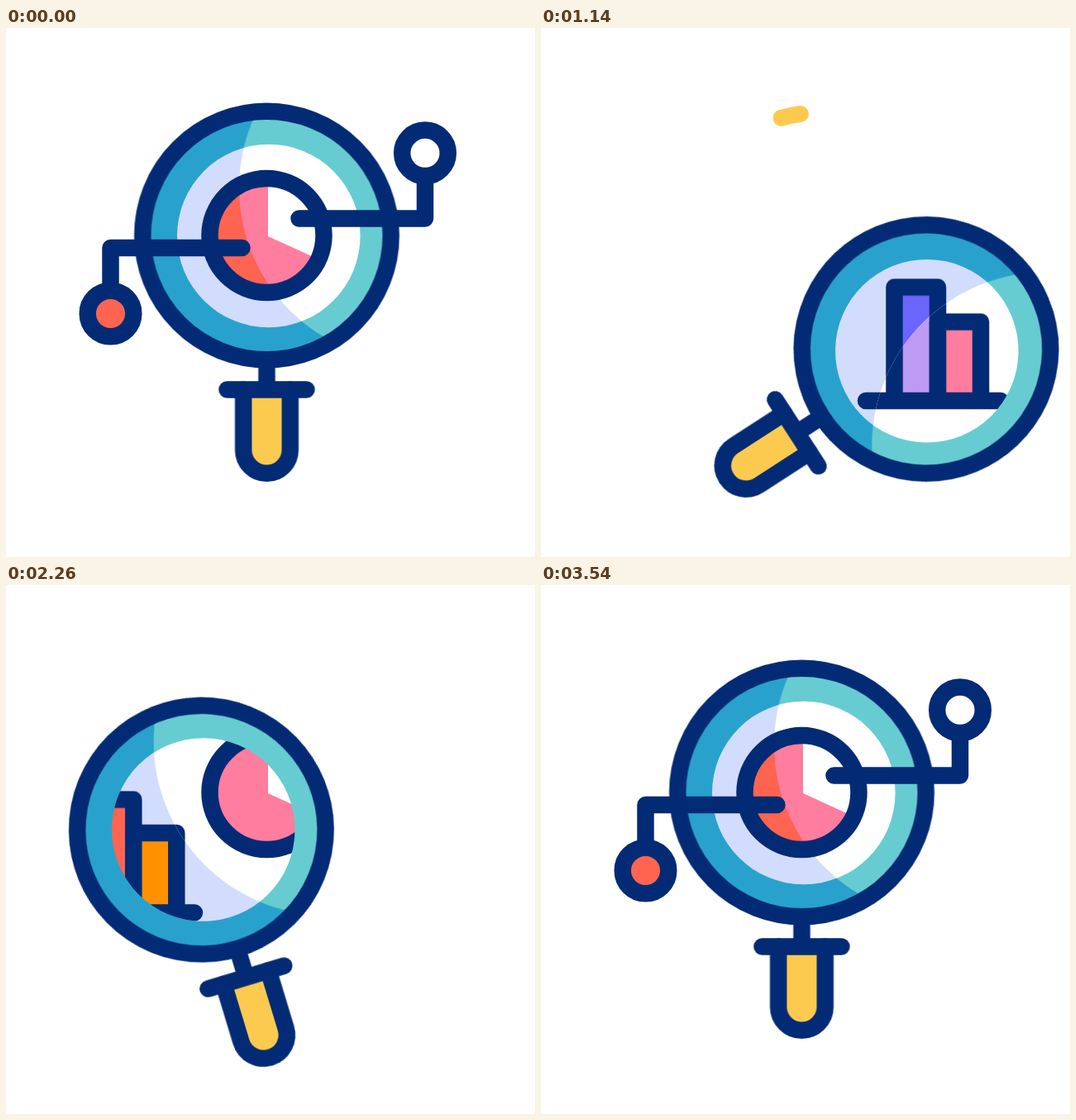
An HTML page without scripts that plays this animation: 640x640 px, repeating every 3.6 s.

```html
<!DOCTYPE html>
<html lang="en">
<head>
<meta charset="utf-8">
<title>Magnifier over charts</title>
<style>
  html, body { margin: 0; width: 100%; height: 100%; overflow: hidden; background: #fff; }
  svg { display: block; width: 100vw; height: 100vh; }

  .line { fill: none; stroke: #032b75; stroke-width: 20.5; stroke-linecap: round; stroke-linejoin: round; }
  .trail { fill: none; stroke: #fdca50; stroke-width: 20; stroke-linecap: round; }
  .trim { stroke-dasharray: 1 2; }

  .shade { --paper: #d2dcfd; --pink: #ff6450; --purple: #6a66fb; --yellow: #ff9100; }
  .light { --paper: #fff; --pink: #ff7d9f; --purple: #bd9af3; --yellow: #fdca50; }
  .paper { fill: var(--paper); }
  .pink { fill: var(--pink); }
  .purple { fill: var(--purple); }
  .yellow { fill: var(--yellow); }
  .slice { fill: none; stroke: var(--paper); stroke-width: 62; }

  .lens, .bar, .slice, .trim, .node, .ball {
    animation: 3.6s cubic-bezier(.333, 0, .667, 1) infinite;
  }
  .lens { animation-name: swing; }
  .slice { animation-name: slice; }
  .trail { animation-name: trail; }
  .ball { animation-name: pop; transform-box: fill-box; transform-origin: center; }
  .node.right { animation-name: rise; }
  .node.left { animation-name: drop; }
  .right .trim { animation-name: trim-right; }
  .left .trim { animation-name: trim-left; }
  .a { animation-name: bar-a; }
  .b { animation-name: bar-b; }
  .c { animation-name: bar-c; }
  .d { animation-name: bar-d; }

  /* The origin of the lens group is the point it swings around. */
  @keyframes swing {
    0%, 3.3% { transform: translate(315.5px, 471px) rotate(0deg); }
    27.2%, 49.8% { transform: translate(281.3px, 508px) rotate(57.1deg); }
    67.8%, 87.1% { transform: translate(304.5px, 506.4px) rotate(-34deg); }
    95.6%, 100% { transform: translate(315.5px, 471px) rotate(0deg); }
  }
  @keyframes slice {
    0%, 48.3% { stroke-dasharray: 114.5 360; }
    63.8%, 75% { stroke-dasharray: 215 360; }
    91.7%, 100% { stroke-dasharray: 114.5 360; }
  }
  @keyframes trail {
    0%, 8.3% { stroke-dashoffset: 1.1; }
    19.44% { stroke-dashoffset: .09; }
    21.5%, 25% { stroke-dashoffset: 0; }
    34.2%, 100% { stroke-dashoffset: -1.1; }
  }
  @keyframes pop {
    0%, 12% { transform: scale(1); }
    15.3%, 82.5% { transform: scale(0); }
    85.3%, 100% { transform: scale(1); }
  }
  @keyframes rise {
    0%, 3.3% { transform: translateY(0); }
    13.3% { transform: translateY(-64px); }
    20%, 83.3% { transform: translateY(0); }
    93.3% { transform: translateY(-91px); }
    98.3%, 100% { transform: translateY(0); }
  }
  @keyframes drop {
    0%, 3.3% { transform: translateY(0); }
    13.3% { transform: translateY(180px); }
    20%, 84.6% { transform: translateY(213.5px); }
    96.4%, 100% { transform: translateY(0); }
  }
  @keyframes trim-right {
    0%, 3.3% { stroke-dashoffset: 0; }
    12%, 83.3% { stroke-dashoffset: 1.1; }
    88.33% { stroke-dashoffset: .653; }
    95.6%, 100% { stroke-dashoffset: 0; }
  }
  @keyframes trim-left {
    0%, 3.3% { stroke-dashoffset: 0; }
    12%, 87.5% { stroke-dashoffset: 1.1; }
    96.4%, 100% { stroke-dashoffset: 0; }
  }
  @keyframes bar-a {
    0%, 26% { transform: translateY(313.5px); }
    38.9% { transform: translateY(340.5px); }
    54.5%, 100% { transform: translateY(313.5px); }
  }
  @keyframes bar-b {
    0%, 26% { transform: translateY(355.5px); }
    38.9% { transform: translateY(313.5px); }
    54.5%, 100% { transform: translateY(355.5px); }
  }
  @keyframes bar-c {
    0%, 63% { transform: translateY(259.5px); }
    70% { transform: translateY(294.5px); }
    75% { transform: translateY(301px); }
    88%, 100% { transform: translateY(259.5px); }
  }
  @keyframes bar-d {
    0%, 68% { transform: translateY(300px); }
    70% { transform: translateY(297.5px); }
    77% { transform: translateY(270px); }
    88%, 100% { transform: translateY(300px); }
  }
</style>
</head>
<body>
<svg viewBox="0 0 640 640">
  <defs>
    <clipPath id="glass"><circle class="lens" cx="2.3" cy="-219.5" r="110.8"/></clipPath>
    <clipPath id="lit"><circle class="lens" cx="176" cy="-277.5" r="209.5"/></clipPath>
    <clipPath id="rim-lit"><circle cx="176" cy="-277.5" r="209.5"/></clipPath>
    <clipPath id="above-base"><path d="M0 0H640V451H320V396.5H0Z"/></clipPath>

    <g id="scene">
      <rect class="paper" width="640" height="640"/>
      <circle class="pink" cx="315.5" cy="251" r="66"/>
      <circle class="slice" r="31" pathLength="360" transform="translate(317 252) rotate(-90)"/>
      <circle class="line" cx="315.5" cy="251" r="69"/>
      <g clip-path="url(#above-base)">
        <g class="bar a"><rect class="line purple" x="427.5" width="52.5" height="300" style="fill:var(--purple)"/></g>
        <g class="bar b"><rect class="line" x="480" width="52" height="300" style="fill:var(--pink)"/></g>
        <g class="bar c"><rect class="line" x="102" width="52.3" height="300" style="fill:var(--pink)"/></g>
        <g class="bar d"><rect class="line" x="154.3" width="52" height="300" style="fill:var(--yellow)"/></g>
      </g>
      <path class="line" d="M393 451H556M70 396.5H228"/>
    </g>
  </defs>

  <path class="trail trim" pathLength="1" d="M169.5 270C183 190 226 122 294 108Q304 105 314 104"/>

  <g class="lens">
    <circle cy="-220" r="146" fill="#28a2cd"/>
    <circle cy="-220" r="146" fill="#67ccd1" clip-path="url(#rim-lit)"/>
  </g>

  <g clip-path="url(#glass)">
    <use href="#scene" class="shade"/>
    <g clip-path="url(#lit)"><use href="#scene" class="light"/></g>
  </g>

  <g class="lens">
    <circle class="line" cy="-220" r="150.25"/>
    <path class="line" d="M0 -62V-34"/>
    <path class="line" d="M-28.3 -33.5V39.5a28.3 28.3 0 0 0 56.6 0V-33.5" style="fill:#fdca50"/>
    <path class="line" d="M-48 -33.5H48"/>
  </g>

  <g class="node right">
    <path class="line trim" pathLength="1" d="M507 151V230.5H354.5"/>
    <circle class="line ball" cx="507" cy="151.3" r="27.8" style="fill:#fff"/>
  </g>
  <g class="node left">
    <path class="line trim" pathLength="1" d="M126.5 345.5V266H285.5"/>
    <circle class="line ball" cx="126.5" cy="345.5" r="27.8" style="fill:#ff6450"/>
  </g>
</svg>
</body>
</html>
```
